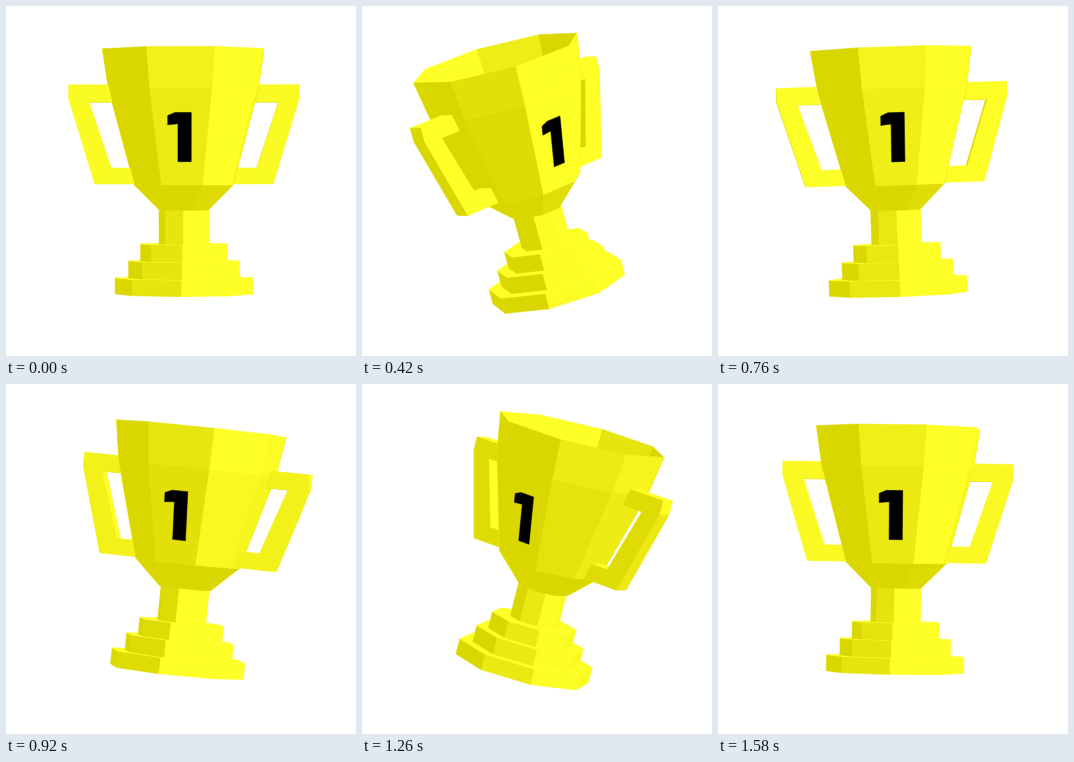
Recreate the animation shown at these times as an HTML page with a canvas. Size 350 by 350 pixels, loop 1600 ms.

```html
<!DOCTYPE html>
<html lang="en">
<head>
<meta charset="utf-8">
<title>Trophy</title>
<style>
html, body { margin: 0; height: 100%; overflow: hidden; background: #fff; }
canvas { display: block; }
</style>
</head>
<body>
<canvas id="stage" width="350" height="350"></canvas>
<script>
const ctx = document.getElementById('stage').getContext('2d');
const LOOP = 1600, RAD = Math.PI / 180;
const MIDDLE = 175, PIVOT = [178, 215], EYE = 3000;
const LIGHT = [0.55, 0.65, 0.45];
const DARK = [218, 214, 0], BRIGHT = [255, 255, 40];
const TWIST = -2.5;

// Solids use x right, y up, z towards the viewer; faces wind counter-clockwise.
const ring = (r, y, start) => Array.from({ length: 8 }, (_, k) => {
  const a = (start + 45 * k) * RAD;
  return [r * Math.sin(a), y, r * Math.cos(a)];
});

function band(r0, y0, r1, y1, start) {
  const low = ring(r0, y0, start), high = ring(r1, y1, start);
  return low.map((p, k) => {
    const n = (k + 1) % 8;
    return [p, low[n], high[n], high[k]];
  });
}

const tier = (r, y0, y1) =>
  [...band(r, y0, r, y1, TWIST), ring(r, y1, TWIST)];

function handle(side) {
  const depth = 9;
  const outline = [[50, 37], [89, 37], [115, 122], [115, 136], [76, 136],
    [72, 119], [95, 119], [73, 53], [54, 53]].map(([x, y]) => [side * x, y]);
  if (side < 0) outline.reverse();
  const walls = outline.map((a, k) => {
    const b = outline[(k + 1) % outline.length];
    return [[...a, -depth], [...b, -depth], [...b, depth], [...a, depth]];
  });
  return [...walls, outline.map(p => [...p, depth])];
}

const foot = [
  ...tier(69, -73, -57),
  ...tier(55.5, -57, -40),
  ...tier(43.5, -40, -23),
  ...band(25, -23, 25, 12, TWIST)
];
const cup = [
  ...band(26, 11, 52.5, 36, 22.5 + TWIST),
  ...band(52.5, 36, 79.5, 131, 22.5 + TWIST),
  ...band(79.5, 131, 86, 171, 22.5 + TWIST)
];
const leftHandle = handle(-1), rightHandle = handle(1);

// The digit lies on the sloping front facet.
const digit = [[-16, 104], [-9, 107], [7, 107], [7, 59], [-6, 59], [-6, 96], [-16, 95]]
  .map(([x, y]) => [x, y, 48.8 + (y - 36) * 0.262 - x * Math.tan(TWIST * RAD)]);

function rotator(roll, yaw) {
  const sr = Math.sin(roll), cr = Math.cos(roll);
  const sy = Math.sin(yaw), cy = Math.cos(yaw);
  return ([x, y, z]) => {
    const u = x * cr - y * sr;
    return [u * cy + z * sy, x * sr + y * cr, z * cy - u * sy];
  };
}

function project([x, y, z]) {
  const k = EYE / (EYE - z);
  return [MIDDLE + (PIVOT[0] + x - MIDDLE) * k, MIDDLE + (PIVOT[1] - y - MIDDLE) * k];
}

// Sum of the cross products of neighbours, valid for concave outlines too.
const area = (points, i, j) => points.reduce((sum, p, k) => {
  const q = points[(k + 1) % points.length];
  return sum + p[i] * q[j] - p[j] * q[i];
}, 0);

function normal(points) {
  const n = [area(points, 1, 2), area(points, 2, 0), area(points, 0, 1)];
  const len = Math.hypot(...n);
  return n.map(v => v / len);
}

function shade(n) {
  const lit = n.reduce((sum, v, i) => sum + v * LIGHT[i], 0);
  const k = Math.min(1, Math.max(0, lit / 0.5));
  return `rgb(${DARK.map((v, i) => Math.round(v + (BRIGHT[i] - v) * k))})`;
}

function fill(points, color) {
  ctx.beginPath();
  for (const [x, y] of points) ctx.lineTo(x, y);
  ctx.closePath();
  ctx.fillStyle = ctx.strokeStyle = color;
  ctx.fill();
  ctx.stroke();
}

function drawFaces(faces, turn, inside = false) {
  for (const face of faces) {
    const solid = face.map(turn), flat = solid.map(project);
    const facing = area(flat, 0, 1) < 0;
    if (facing === inside) continue;
    const n = normal(solid);
    fill(flat, shade(inside ? n.map(v => -v) : n));
  }
}

function draw(now) {
  const swing = Math.asin(Math.sin(now / LOOP * 2 * Math.PI)) / (Math.PI / 2);
  const turn = rotator(20 * RAD * swing, 40 * RAD * swing);
  const [back, front] = swing > 0 ? [rightHandle, leftHandle] : [leftHandle, rightHandle];
  ctx.fillStyle = '#fff';
  ctx.fillRect(0, 0, 350, 350);
  ctx.lineWidth = 0.5;
  ctx.lineJoin = 'round';
  drawFaces(foot, turn);
  drawFaces(back, turn);
  drawFaces(cup, turn, true);
  drawFaces(cup, turn);
  drawFaces(front, turn);
  fill(digit.map(turn).map(project), '#000');
  requestAnimationFrame(draw);
}
requestAnimationFrame(draw);
</script>
</body>
</html>
```
